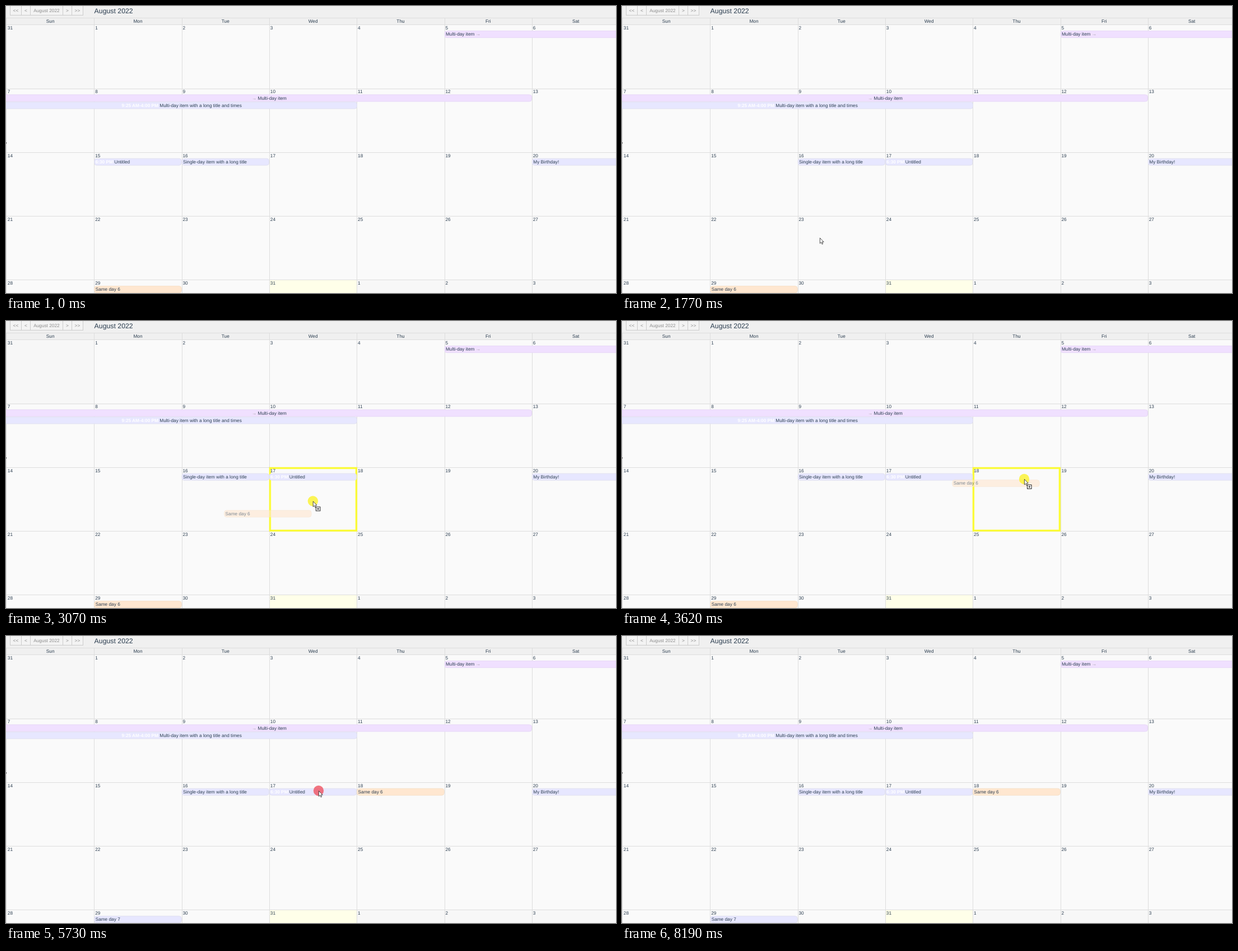
An HTML page for the animation above (8450 ms loop, 1089 by 514 pixels).

```html
<!DOCTYPE html>
<html lang="en">
<head>
<meta charset="utf-8">
<title>Calendar drag and context menu</title>
<style>
  html, body { margin: 0; width: 100%; height: 100%; overflow: hidden; background: #fafafa; }
  svg { display: block; width: 1089px; height: 514px; }
  text { font: 8.28px "Liberation Sans", Arial, sans-serif; fill: #2c3e50; white-space: pre; text-rendering: geometricPrecision; }
  .crisp { shape-rendering: crispEdges; }
  .mid { text-anchor: middle; }
  .time { font-weight: bold; fill: #fff; }
  .more { fill: #999; }
  .btn { fill: #8d8d8d; }
  .title { font-size: 12.3px; }
  .menu text { font: 8.9px "Liberation Sans", "Noto Sans CJK SC", "Noto Sans CJK", sans-serif; fill: #444; }
  .menu .head { font-weight: bold; fill: #333; }
  .menu .sel { fill: #fff; }
</style>
</head>
<body>
<svg id="stage" viewBox="0 0 1089 514" xmlns="http://www.w3.org/2000/svg"></svg>
<script>
const LOOP = 8450, STEP = 70;
const COL = 156.33, ROW = 114.25, LEFT = 1, TOP = 33.3;
const colX = c => Math.round(LEFT + COL * c);
const rowY = r => Math.round(TOP + ROW * r);
const itemY = r => TOP + ROW * r + 10.9;

const COLORS = {
  lilac: ['#e7e7ff', '#e0e0f0'],
  purple: ['#f0e0ff', '#e7d7f7'],
  orange: ['#ffe7d0', '#f7e0c7']
};
const UNTITLED = '<tspan class="time">6:30 PM</tspan> Untitled';

const rect = (x, y, w, h, fill, extra = '') =>
  `<rect x="${x}" y="${y}" width="${w}" height="${h}" fill="${fill}" ${extra}/>`;
const text = (x, y, s, cls = '') => `<text x="${x}" y="${y}" class="${cls}">${s}</text>`;

function bar(x, y, w, color, label, labelX = x + 2.3, cls = '') {
  const [fill, edge] = COLORS[color];
  return rect(x + .5, y + .5, w - 1, 12, fill, `rx="4" stroke="${edge}"`) +
    text(labelX, y + 9.2, label, cls);
}
const dayBar = (c, r, color, label, w = COL) => bar(LEFT + COL * c, itemY(r), w, color, label);
const group = (id, body, attrs = '') => `<g id="${id}" ${attrs}>${body}</g>`;

function grid() {
  let s = rect(0, 0, 1089, 514, '#fafafa') + rect(0, 0, 1089, 33, '#f0f0f0') +
    rect(0, 33, 157, 115, '#f7f7f7') + rect(470, 490, 156, 24, '#ffffe9') +
    rect(626, 490, 463, 24, '#f7f7f7') + rect(0, 21, 1089, 1, '#ddd') + rect(0, 21, 1, 493, '#ddd');
  for (let c = 1; c < 7; c++) s += rect(colX(c), 21, 1, 493, '#ddd');
  for (let r = 0; r < 5; r++) s += rect(0, rowY(r), 1089, 1, '#ddd');
  return `<g class="crisp">${s}</g>`;
}

function header() {
  const edges = [7, 27, 43, 101, 117, 137];
  const names = ['&lt;&lt;', '&lt;', 'August 2022', '&gt;', '&gt;&gt;'];
  let s = '';
  names.forEach((n, i) => {
    const x = edges[i], w = edges[i + 1] - x;
    s += rect(x + .5, -.5, w, 16.5, '#f3f3f3', 'stroke="#ccc" class="crisp"') +
      text(x + w / 2 + .4, 11, n, 'btn mid');
  });
  s += text(157.6, 12.6, 'August 2022', 'title');
  ['Sun', 'Mon', 'Tue', 'Wed', 'Thu', 'Fri', 'Sat'].forEach((d, c) => {
    s += text(LEFT + COL * (c + .5), 30.2, d, 'mid');
  });
  return s;
}

function dayNumbers() {
  let s = '';
  for (let i = 0; i < 35; i++) {
    const c = i % 7, r = (i - c) / 7;
    s += text(LEFT + COL * c + 1.8, TOP + ROW * r + 8.9, (i + 30) % 31 + 1);
  }
  return s;
}

function menu() {
  const names = ['学习', '元素', '属性', '标题', '段落', '图像', '表格', '列表', '布局'];
  let s = rect(5, 1, 87, 260, '#000', 'opacity=".12"') + rect(4, 0, 87, 260, '#000', 'opacity=".28"') +
    rect(3, -1, 87, 260, '#fff');
  s += rect(28, 147.5, 35, 12.5, '#4f8ff7') + rect(16, 170.5, 12, 12.5, '#4f8ff7');
  names.forEach((n, i) => {
    let label = 'HTML ' + n;
    if (i === 6) label = `HT<tspan class="sel">ML ${n}</tspan>`;
    if (i === 7) label = `<tspan class="sel">HT</tspan>ML ${n}`;
    s += text(15.8, 17.3 + 23.2 * i, label, i ? '' : 'head');
  });
  return s + text(15.8, 17.3 + 23.2 * 9, '表单');
}

const stage = document.getElementById('stage');
stage.innerHTML = grid() + header() +
  '<g id="hover"><rect width="154" height="112" fill="none" stroke="#ff0" stroke-width="4" opacity=".4"/>' +
  '<rect width="154" height="112" fill="none" stroke="#fcfc28" stroke-width="2.4"/></g>' +
  dayNumbers() +
  dayBar(5, 0, 'purple', 'Multi-day item <tspan class="more">→</tspan>', 330) +
  bar(-8, itemY(1), 947, 'purple', '<tspan class="more">→</tspan> Multi-day item', 470, 'mid') +
  bar(-8, itemY(1) + 13, 635, 'lilac',
    '<tspan class="time">9:25 AM-4:00 PM</tspan> Multi-day item with a long title and times', 313.7, 'mid') +
  dayBar(2, 2, 'lilac', 'Single-day item with a long title') +
  dayBar(6, 2, 'lilac', 'My Birthday!', 170) +
  group('mon15', dayBar(1, 2, 'lilac', UNTITLED)) +
  group('wed17', dayBar(3, 2, 'lilac', UNTITLED)) +
  group('thu18', dayBar(4, 2, 'orange', 'Same day 6')) +
  group('six', dayBar(1, 4, 'orange', 'Same day 6')) +
  group('seven', dayBar(1, 4, 'lilac', 'Same day 7')) +
  rect(0, 244, 1, 2.5, '#555') +
  group('menu', menu(), 'class="menu"') +
  group('ghost0', bar(0, 0, COL, 'lilac', UNTITLED), 'opacity=".6"') +
  group('ghost1', bar(0, 0, COL, 'orange', 'Same day 6'), 'opacity=".6"') +
  group('cursor',
    '<circle id="press" r="9.2" opacity=".8"/>' +
    '<path d="M.4 .4V10.2L2.6 8.2 4.2 11.7 5.7 11 4.2 7.6H7.2Z" fill="#fff" stroke="#222" stroke-width=".8"/>' +
    group('copy', rect(5.5, 10.5, 7.5, 7, '#fff', 'stroke="#222"') +
      '<path d="M9.25 12v4M7.25 14h4" stroke="#222"/>'));

const el = {};
stage.querySelectorAll('[id]').forEach(n => el[n.id] = n);
const show = (id, on) => el[id].setAttribute('visibility', on ? 'visible' : 'hidden');
const place = (id, x, y) => el[id].setAttribute('transform', `translate(${x.toFixed(2)} ${y.toFixed(2)})`);

// Pointer path: time, x, y
const PATH = [
  [70, 1002, 508], [430, 520, 360], [890, 272, 277], [960, 272, 277],
  [1100, 385, 290], [1170, 467, 297], [1240, 506, 299], [1480, 556, 304], [1540, 552, 308],
  [1770, 353, 415], [2180, 284, 505], [2440, 284, 505], [2510, 313, 487], [2580, 322, 479],
  [2900, 470, 372], [3210, 590, 300], [3340, 600, 298], [3550, 716, 288], [3620, 718, 283],
  [3800, 700, 278], [4150, 697, 276], [4840, 697, 276], [5380, 568, 277], [5590, 558, 277],
  [5870, 558, 277], [6280, 458, 288], [6410, 458, 288], [6620, 418, 277], [6760, 403, 280],
  [7030, 403, 280], [7240, 361, 300], [7320, 372, 305], [7780, 952, 461], [8190, 1052, 512]
];
// Spans of movement; the screen holds still between them
const SPANS = [[70, 890], [960, 1770], [1840, 2180], [2440, 3210], [3340, 4150], [4220, 4220],
  [4570, 5380], [5450, 6280], [6410, 6760], [6960, 7780], [7840, 8190]];
const DRAGS = [
  { from: 960, to: 1500, grab: [272, 277], home: [LEFT + COL, itemY(2)] },
  { from: 2440, to: 3830, grab: [284, 505], home: [LEFT + COL, itemY(4)] }
];
const MENUS = [
  { press: 4570, open: 4640, close: 5030, at: [697, 276] },
  { press: 5660, open: 5800, close: 6480, at: [558, 277] },
  { press: 6960, open: 7030, close: 7310, at: [403, 280] }
];

function tick(t) {
  let q = 0;
  for (const [a, b] of SPANS) {
    if (t >= b) q = b;
    else if (t >= a) q = a + Math.floor((t - a) / STEP) * STEP;
  }
  return q;
}

const slope = (i, k) => (PATH[i + 1][k] - PATH[i][k]) / (PATH[i + 1][0] - PATH[i][0]);
function tangent(i, k) {
  if (i === 0 || i === PATH.length - 1) return 0;
  const a = slope(i - 1, k), b = slope(i, k);
  return a * b > 0 ? 2 * a * b / (a + b) : 0;
}
// Monotone cubic through the path points
function pointer(t) {
  t = Math.max(PATH[0][0], Math.min(t, PATH[PATH.length - 1][0]));
  let i = 0;
  while (i < PATH.length - 2 && t >= PATH[i + 1][0]) i++;
  const p = PATH[i], n = PATH[i + 1], h = n[0] - p[0], u = (t - p[0]) / h, v = 1 - u;
  return [1, 2].map(k => p[k] * (1 + 2 * u) * v * v + n[k] * u * u * (3 - 2 * u) +
    h * (tangent(i, k) * u * v * v - tangent(i + 1, k) * u * u * v));
}

function draw(time) {
  const t = tick(time);
  const [x, y] = pointer(t), [lx, ly] = pointer(t - STEP);
  const drag = DRAGS.find(d => t >= d.from && t < d.to);
  const dragging = drag && t >= drag.from + STEP;
  const open = MENUS.find(m => t >= m.open && t < m.close);
  const click = MENUS.some(m => t >= m.press && t < m.open);

  show('mon15', t < DRAGS[0].to);
  show('wed17', t >= DRAGS[0].to);
  show('six', t < DRAGS[1].to);
  show('seven', t >= DRAGS[1].to);
  show('thu18', t >= DRAGS[1].to);

  // The dragged copy and the hovered day trail the pointer by one step
  show('hover', dragging);
  DRAGS.forEach((d, i) => show('ghost' + i, dragging && d === drag));
  if (dragging) {
    const { grab, home } = drag;
    place('ghost' + DRAGS.indexOf(drag), home[0] + lx - grab[0], home[1] + ly - grab[1]);
    const c = Math.floor((lx - LEFT) / COL), r = Math.floor((ly - TOP) / ROW);
    place('hover', colX(c) + 1.4, rowY(r) + 1.4);
  }

  show('menu', open);
  if (open) place('menu', ...open.at);

  const seen = t >= 70 && t < 8190;
  show('cursor', seen);
  show('copy', seen && dragging);
  show('press', seen && (drag || click));
  el.press.setAttribute('fill', click ? '#ef5360' : '#fbf22c');
  place('cursor', x, y);
}

function frame() {
  draw(performance.now() % LOOP);
  requestAnimationFrame(frame);
}
frame();
</script>
</body>
</html>
```
